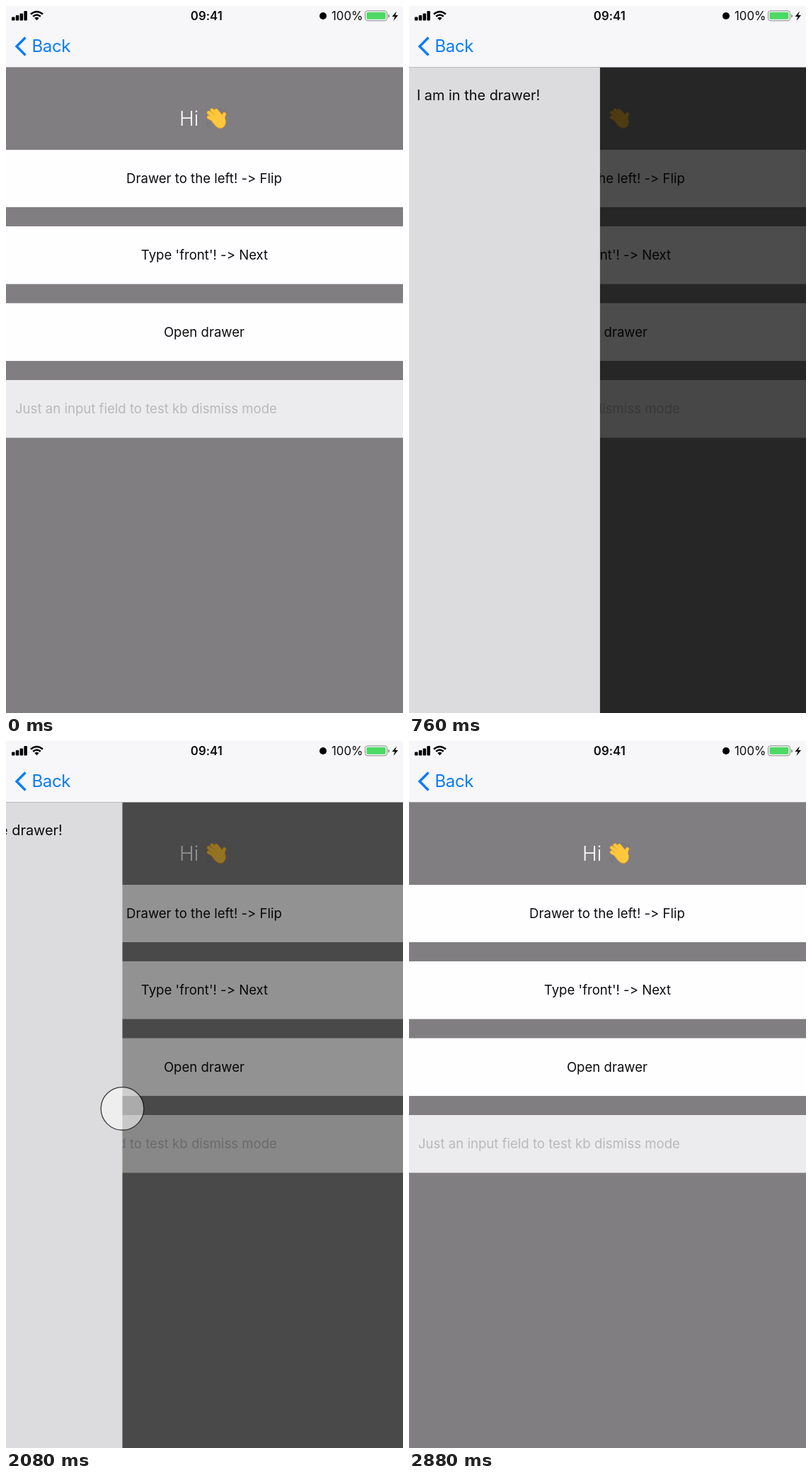
An HTML page for the animation above (3.28 s loop, 561 by 998 pixels).

```html
<!DOCTYPE html>
<html lang="en">
<head>
<meta charset="utf-8">
<title>Drawer</title>
<style>
  html, body { margin: 0; width: 100%; height: 100%; overflow: hidden; background: #807e80; }
  svg { display: block; width: 100vw; height: 100vh; }
  text {
    font: 18.6px Inter, "Open Sans", sans-serif;
    font-feature-settings: "calt" 0, "liga" 0;
    fill: #0c0c0d;
  }
  .mid { text-anchor: middle; }
  .status { font-size: 16.8px; }
  .line { fill: none; stroke-linecap: round; }
</style>
</head>
<body>
<svg viewBox="0 0 561 998">
  <rect width="561" height="998" fill="#807e80"/>

  <text x="245" y="168.5" style="font-size:28px;font-weight:300;fill:#fefdff">Hi</text>
  <g class="line" stroke-linejoin="round">
    <g stroke="#77757a" stroke-width="1.3">
      <path d="M283.500 164q1 5 5.500 7.500M286.500 163.500q1 3 3.500 4.500"/>
      <path d="M301.500 144.500q4 1 5.500 4M309 145.500q2.500 2 3 5"/>
    </g>
    <path id="hand" stroke="#e59c22" stroke-width="5.400"
      d="M300 164L286.500 157M301 161L286.500 150.500M303 158L291 147M305 157L297 147.500M307.500 163Q306 157 308.500 152.500"/>
    <path d="M294 158L304 152.500L310 160Q312 168 306 172Q300 174 295 168L291 163Z" fill="#ffc83d" stroke="#e59c22" stroke-width=".8"/>
    <path stroke="#ffc83d" stroke-width="4.300"
      d="M300 164L286.500 157M301 161L286.500 150.500M303 158L291 147M305 157L297 147.500M307.500 163Q306 157 308.500 152.500"/>
  </g>

  <g fill="#fefdff">
    <rect y="203" width="561" height="81"/>
    <rect y="311" width="561" height="81.500"/>
    <rect y="419.500" width="561" height="81.500"/>
    <rect y="528" width="561" height="81.500" fill="#ecebed"/>
  </g>
  <text class="mid" x="280" y="249.700">Drawer to the left! -&gt; Flip</text>
  <text class="mid" x="280.500" y="358.200">Type 'front'! -&gt; Next</text>
  <text class="mid" x="280" y="466.800">Open drawer</text>
  <text x="13" y="574.700" style="fill:#b9b8ba">Just an input field to test kb dismiss mode</text>

  <rect id="dim" y="86" width="561" height="912"/>
  <g id="drawer">
    <rect x="-561" y="86" width="561" height="912" fill="#dcdbdd"/>
    <text x="-259" y="133.300" style="font-size:19.9px">I am in the drawer!</text>
  </g>

  <rect width="561" height="86" fill="#f7f6f8"/>
  <rect y="86" width="561" height=".8" fill="#b2b1b3"/>
  <path class="line" d="M27.500 44.500L15 57L27.500 69.500" stroke="#087cfa" stroke-width="3.400" style="stroke-linecap:butt"/>
  <text x="36.500" y="65.300" style="font-size:24px;letter-spacing:-.4px;fill:#087cfa">Back</text>

  <rect x="8" y="15.500" width="4.500" height="5" rx="1"/>
  <rect x="13.800" y="13" width="4.500" height="7.500" rx="1"/>
  <rect x="19.600" y="10.500" width="4.500" height="10" rx="1"/>
  <rect x="25.400" y="7" width="4.500" height="13.500" rx="1"/>
  <path class="line" d="M35 11.500Q43.500 4.500 52 11.500M38.200 14.700Q43.500 10.200 48.800 14.700" stroke="#000" stroke-width="2.500" style="stroke-linecap:butt"/>
  <path d="M40.300 17Q43.500 14.500 46.700 17L43.500 20.300Z"/>
  <text class="mid status" x="283.300" y="20.300" style="font-weight:600">09:41</text>
  <circle cx="448" cy="14" r="5"/>
  <text class="status" x="460" y="20.300">100%</text>
  <rect x="507.500" y="6.800" width="31" height="14" rx="3.500" fill="none" stroke="#8b8a8c"/>
  <rect x="509.500" y="8.800" width="27" height="10" rx="1.800" fill="#4cd964"/>
  <path d="M540 11.500q2 .5 2 2.500t-2 2.500z" fill="#8b8a8c"/>
  <path d="M552 7.500L545.500 15H549.500L547.500 21L554 13H550Z"/>

  <circle id="touch" fill="#fff" fill-opacity=".54" stroke="#000" stroke-opacity=".75"/>
</svg>

<script>
const LOOP = 3280, STEP = 40, WIDTH = 271;
const TAP = { start: 200, end: 331 };
const DRAG = { start: 1600, end: 2320, glide: 668 };
const RELEASE = 210;
const [dim, drawer, touch] = ["dim", "drawer", "touch"].map(id => document.getElementById(id));

// Share of the way left for a critically damped spring
const springLeft = ms => {
  const a = 0.0179 * Math.max(0, ms);
  return (1 + a) * Math.exp(-a);
};

function dragPoint(t) {
  const u = Math.min(1, Math.max(0, (t - DRAG.start) / DRAG.glide));
  const left = 1 - u * u * (3 - 2 * u);
  return [130.5 + 176 * left, 510 + 27.2 * left ** 0.675];
}

function drawerEdge(t) {
  if (t < DRAG.start) return WIDTH * (1 - springLeft(t - TAP.end));
  const x = Math.min(WIDTH, dragPoint(t)[0]);
  return x * springLeft(t - DRAG.end);
}

function drawTouch(t) {
  const dragging = t >= DRAG.start;
  const { start, end } = dragging ? DRAG : TAP;
  const [x, y] = dragging ? dragPoint(t) : [239.5, 444.5];
  const u = Math.min(1, Math.max(0, (t - end) / RELEASE));
  const left = (1 - u) ** 2;
  const scale = 2 - left;
  touch.setAttribute("cx", x);
  touch.setAttribute("cy", y);
  touch.setAttribute("r", 30.3 * scale);
  touch.setAttribute("stroke-width", 1.3 * scale);
  touch.setAttribute("opacity", t < start ? 0 : left);
}

function draw() {
  const t = Math.floor(performance.now() % LOOP / STEP) * STEP;
  const edge = drawerEdge(t);
  drawer.setAttribute("transform", `translate(${edge})`);
  dim.setAttribute("opacity", 0.7 * edge / WIDTH);
  drawTouch(t);
  requestAnimationFrame(draw);
}
draw();
</script>
</body>
</html>
```
